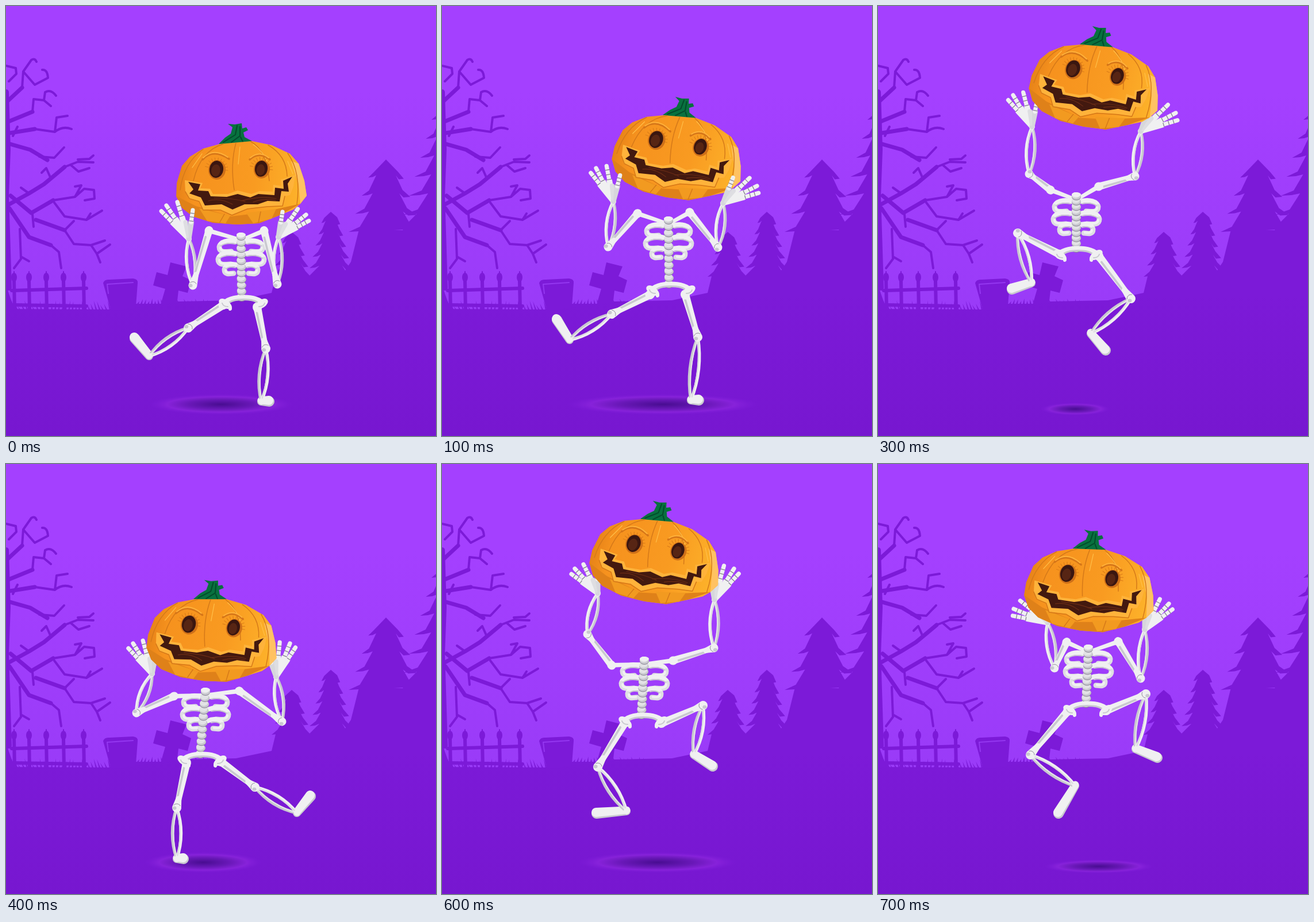
These frames come from a looping animation (748x748 px, 800 ms). An HTML page with a canvas:

```html
<!DOCTYPE html>
<html lang="en">
<head>
<meta charset="utf-8">
<title>Dancing pumpkin skeleton</title>
<style>
  html, body { margin: 0; width: 100%; height: 100%; overflow: hidden; background: #7a19d6; }
  canvas { display: block; width: 748px; height: 748px; }
</style>
</head>
<body>
<canvas id="stage" width="748" height="748"></canvas>
<script>
const ctx = document.getElementById('stage').getContext('2d');
const TAU = Math.PI * 2;
const BONE = '#f0f0f1', SHADE = '#c9c9cf', LINE = '#85808f', DUSK = '#7c1ad8';
ctx.lineCap = ctx.lineJoin = 'round';

// Drawing helpers
function fill(d, color) {
  ctx.fillStyle = color;
  ctx.fill(new Path2D(d));
}
function line(d, color, width) {
  ctx.strokeStyle = color;
  ctx.lineWidth = width;
  ctx.stroke(new Path2D(d));
}
function oval(x, y, rx, ry, color, turn = 0) {
  ctx.fillStyle = color;
  ctx.beginPath();
  ctx.ellipse(x, y, rx, ry, turn, 0, TAU);
  ctx.fill();
}
function blend(color0, color1, x0, y0, x1, y1) {
  const g = ctx.createLinearGradient(x0, y0, x1, y1);
  g.addColorStop(0, color0);
  g.addColorStop(1, color1);
  return g;
}
const mix = (a, b, k) => a.map((v, i) => v + (b[i] - v) * k);
const polar = ([x, y], angle, r) => [x + Math.cos(angle) * r, y + Math.sin(angle) * r];
const heading = (a, b) => Math.atan2(b[1] - a[1], b[0] - a[0]);

function taper(a, b, ra, rb, color) {
  const t = heading(a, b), q = Math.PI / 2;
  ctx.fillStyle = color;
  ctx.beginPath();
  ctx.arc(...a, ra, t + q, t - q);
  ctx.arc(...b, rb, t - q, t + q);
  ctx.fill();
}

// Scenery
function pine(x, top, tiers, h, w) {
  let left = '', right = '';
  for (let i = 1; i <= tiers; i++) {
    const y = top + h * i / tiers, r = w * (.3 + .7 * i / tiers), in_ = r * .55;
    left += `L${x - r * .7} ${y - 9}L${x - r} ${y}L${x - r * .75} ${y - 1}L${x - in_} ${y - 4}`;
    right = `L${x + in_} ${y - 4}L${x + r * .72} ${y + 3}L${x + r} ${y + 2}L${x + r * .68} ${y - 10}` + right;
  }
  fill(`M${x} ${top}${left}${right}Z`, DUSK);
}

function scenery() {
  ctx.fillStyle = blend('#a440ff', '#9a3bf8', 0, 150, 0, 520);
  ctx.fillRect(0, 0, 748, 748);

  line('M0 150L3 250L0 330L5 490', DUSK, 10);
  line('M0 168L28 142M2 202L46 184M0 222L50 214M0 238L42 250L72 268M0 348L40 326L66 310L102 280' +
    'M8 330L44 360L82 338M6 352L40 402L78 416M52 372L102 390', DUSK, 7);
  line('M28 142L30 114L44 94Q50 90 53 97M30 114L50 137L73 125Q72 110 63 111M0 104L17 108L18 118L5 131' +
    'M46 184L48 162L66 164L68 150Q78 144 87 156M66 164L78 174M50 214L85 219Q98 208 114 214M85 219L88 194L107 191', DUSK, 4);
  line('M58 262L84 264L101 246M66 310L78 300L70 282L62 290M102 280L125 271L152 272M125 267L145 266L152 260' +
    'M112 276L126 288L145 282M82 338L120 332L131 312L120 314M120 332L136 318L153 320L154 335L137 338' +
    'M84 342L102 366L140 372L167 356M140 372L147 361', DUSK, 4);
  line('M102 390L118 414L148 416L158 431L181 415M148 416L172 408M158 431L164 446M102 390L118 374' +
    'M78 416L92 428L96 456M24 388L26 440L14 456M26 436L40 444M46 362L48 384M20 210L12 226M40 326L26 316', DUSK, 4);

  for (const x of [14, 40, 70, 100, 135]) {
    line(`M${x} 478L${x + 1} 530`, DUSK, 6);
    oval(x, 472, 5, 8, DUSK);
    line(`M${x} 462V470`, DUSK, 2);
  }
  line('M10 495L140 491M12 520L140 522', DUSK, 6);

  let grass = 'M0 545V486L12 520';
  for (let x = 12; x < 350; x += 6) {
    const h = x < 185 ? 7 + 11 * Math.abs(Math.sin(x * 1.7)) : 3 + 6 * Math.abs(Math.sin(x * 2.3));
    const base = x < 190 ? 530 : 518;
    grass += `L${x} ${base}L${x + 4 * Math.sin(x)} ${base - h}L${x + 3} ${base}`;
  }
  fill(grass + 'L350 545Z', DUSK);
  fill('M169 482Q171 475 180 476L221 474Q230 475 229 482L225 535H184Z', DUSK);
  line('M178 500L176 484L221 481', '#9437f0', 2);
  fill('M286 446L314 453L307 470L322 477L316 499L300 495L296 530H266L277 492L256 486L262 463L281 468Z', DUSK);

  pine(497, 393, 4, 78, 35);
  pine(565, 358, 5, 98, 37);
  pine(661, 267, 4, 126, 65);
  pine(775, 165, 6, 198, 84);
  fill('M0 527L200 528L300 514L400 512L462 499L470 466L515 462L526 471L545 452L582 447L590 460L600 445' +
    'L615 385L690 390L700 376L720 356L748 335V748H0Z', blend(DUSK, '#7717d0', 0, 500, 0, 748));
}

// Skeleton parts
function bone(a, b, r = 4.5) {
  const t = heading(a, b), end = mix(a, b, .9);
  taper(a, end, r + 2, r, BONE);
  taper(polar(mix(a, b, .12), t + 1.57, 2.5), polar(end, t + 1.57, 2.5), 1.8, 1.8, SHADE);
  taper(mix(a, b, .8), b, r, r + 3, BONE);
  oval(...a, r + 3.5, r + 3, BONE, t);
  oval(...polar(b, t + 1.2, 4), 3.5, 3, SHADE);
  ctx.strokeStyle = LINE;
  ctx.lineWidth = .9;
  ctx.beginPath();
  ctx.arc(...b, r + 2, t + 2.1, t + 4);
  ctx.stroke();
}

function twinBone(a, b) {
  const t = heading(a, b), m = mix(a, b, .5);
  for (const [side, color] of [[1, SHADE], [-1, BONE]]) {
    const c = polar(m, t + side * 1.57, 15);
    line(`M${a}Q${c} ${b}`, color, 5.5);
    line(`M${a}Q${polar(m, t + side * 1.57, 11)} ${b}`, side > 0 ? '#e5e5e8' : '#dcdce0', 2);
  }
  oval(...a, 6, 5, BONE, t);
  oval(...b, 5.5, 5, BONE, t);
}

function hand([, , wrist, tip], side) {
  const t = heading(wrist, tip), reach = Math.hypot(tip[0] - wrist[0], tip[1] - wrist[1]);
  [[-.19, .97], [0, 1], [.29, .96], [.73, .72]].forEach(([turn, k], i) => {
    const a = t + side * turn, end = polar(wrist, a, reach * k);
    const knuckle = polar(wrist, a, reach * k * .58);
    taper(wrist, knuckle, 4.5, 5, i == 3 ? '#d7d7dc' : BONE);
    taper(knuckle, end, 3.6, 3.6, BONE);
    for (const s of [.62, .76, .89]) {
      const p = polar(wrist, a, reach * k * s);
      line(`M${polar(p, a + 1.57, 3.6)}L${polar(p, a - 1.57, 3.6)}`, LINE, 1.3);
    }
  });
  taper(polar(wrist, t, 4), polar(wrist, t + side * .4, reach * .42), 2, 4, '#dedee2');
}

function arm(joints) {
  const [shoulder, elbow, wrist] = joints;
  twinBone(elbow, wrist);
  bone(shoulder, elbow);
}

function leg([hip, knee, ankle, toe]) {
  taper(ankle, toe, 7, 9, SHADE);
  taper([ankle[0], ankle[1] - 2], [toe[0] - 1, toe[1] - 2], 6.5, 8, BONE);
  twinBone(knee, ankle);
  bone(hip, knee, 5);
}

function rib(side, y, w, h) {
  ctx.save();
  ctx.scale(side, 1);
  line(`M4 ${y}C${w * .6} ${y - 7} ${w} ${y} ${w} ${y + h * .5}`, BONE, 8);
  line(`M${w} ${y + h * .5}C${w} ${y + h + 4} ${w * .6} ${y + h} ${w * .45} ${y + h}`, '#dedee2', 9);
  line(`M${w - 2} ${y + h * .6}C${w - 2} ${y + h} ${w * .7} ${y + h} ${w * .5} ${y + h - 1}`, BONE, 4);
  line(`M10 ${y + 3}Q${w * .7} ${y} ${w - 3} ${y + h * .4}`, SHADE, 2);
  ctx.restore();
}

function torso({ neck, pelvis, left, right }) {
  ctx.save();
  ctx.translate(...neck);
  for (const side of [-1, 1]) {
    rib(side, 13, 38, 16);
    rib(side, 34, 40, 17);
    rib(side, 54, 29, 13);
  }
  ctx.restore();
  for (const arm of [left, right]) taper([neck[0], neck[1] + 9], arm[0], 3, 4, BONE);
  for (let i = 10; i >= 0; i--) {
    const [x, y] = mix(neck, [pelvis[0] - 3, pelvis[1] - 14], i / 10);
    oval(x, y + 4, 8, 6, LINE);
    oval(x, y + 3, 8, 6, SHADE);
    oval(x - 1, y + 1, 7, 5, '#e2e2e5');
  }
  oval(...neck, 8, 4, BONE);

  ctx.save();
  ctx.translate(...pelvis);
  line('M-34 1C-28 -15 28 -15 34 1', BONE, 9);
  line('M-27 0C-18 -10 18 -10 27 0', SHADE, 3);
  for (const side of [-1, 1]) {
    oval(side * 32, 0, 12, 7, BONE, side * -.6);
    line(`M${side * 32} 1Q${side * 22} 0 ${side * 23} 9`, BONE, 6);
    line(`M${side * 27} 5Q${side * 35} 5 ${side * 37} -1`, SHADE, 2);
  }
  ctx.restore();
}

function pumpkin([x, y, turn]) {
  ctx.save();
  ctx.translate(x, y);
  ctx.rotate(turn * Math.PI / 180);
  ctx.translate(-405, -283);

  fill('M370 240L381 229L391 222L394 211L386 205L398 206L410 204L411 213L418 211L421 216L413 220L415 228L428 235L400 242Z', '#08713f');
  line('M378 237L399 224L402 208M392 237L407 226L407 210M412 236L408 228', '#034b2b', 2);

  const body = 'M372 240L428 235L462 242L494 257L509 274L519 304L523 330L512 344L500 354L476 364L440 378L401 380' +
    'L360 377L325 366L306 351L296 331L297 308L306 278L320 262L343 248Z';
  const skin = ctx.createLinearGradient(296, 300, 523, 320);
  skin.addColorStop(0, '#e68218');
  skin.addColorStop(.15, '#f6921e');
  skin.addColorStop(.6, '#f99b21');
  skin.addColorStop(1, '#fdb52b');
  fill(body, skin);
  fill('M297 331L330 348L392 366L440 360L512 344L476 364L440 378L401 380L360 377L325 366L306 351Z', '#df8119');
  fill('M336 352L390 365L382 378L350 374ZM418 360L470 353L462 370L430 378Z', '#f29a20');
  fill('M509 274L519 304L523 330L512 344L509 310L496 270Z', '#ffc262');
  line('M378 240Q338 252 326 304M400 238Q390 275 397 320M426 236Q453 250 458 304M456 242Q488 260 489 296' +
    'M343 249Q309 273 303 320M490 256Q514 290 506 345M380 362L372 376M443 358L439 377', '#d57919', 1.5);
  line('M407 245L404 275M430 241Q450 255 455 274M341 257L324 281M490 270L499 292', '#ffc04a', 1.2);

  // Brows and eyes
  line('M342 267Q360 247 388 266M424 267Q440 252 459 267', '#d67618', 3.5);
  line('M343 264Q361 246 386 263M425 264Q441 251 457 264', '#ffb13a', 2);
  for (const [ex, ey, rx, ry] of [[366, 284, 12, 15], [444, 283, 11, 14]]) {
    for (let a = -2.9; a < .1; a += .3)
      line(`M${polar([ex, ey], a, 15)}L${polar([ex, ey], a, 20)}`, '#d87a18', 1);
    oval(ex + 1, ey + 1, rx + 3, ry + 2, '#cf7018', .15);
    oval(ex, ey, rx, ry, '#3a1610', .15);
    oval(ex - 1, ey + 2, rx * .65, ry * .7, '#572514', .15);
  }

  // Mouth
  fill('M311 303L342 308L338 317L355 318L360 327L386 327L403 321L427 327L441 322L464 323L465 311L479 313L478 302' +
    'L503 294L500 314L494 329L484 331L481 347L455 348L420 352L393 363L373 354L343 354L336 339L318 335L312 322Z', '#ffb33b');
  fill('M317 306L338 310L334 321L352 322L356 331L384 332L403 327L425 333L439 327L467 329L468 316L483 318L482 304L498 297' +
    'L490 309L492 323L479 322L476 340L455 339L438 345L415 345L394 354L375 345L346 347L339 333L319 326L326 319Z', '#43190f');
  line('M352 339Q372 333 394 345M362 334Q394 334 416 340M409 339Q441 330 470 335M430 341Q449 334 469 338', '#6d2d16', 1.2);
  line('M312 323L319 335L336 340L343 355L373 355L393 364L420 353L455 349L481 348L485 331', '#d57919', 1.5);
  ctx.restore();
}

function shadow([x, y, rx, ry]) {
  ctx.save();
  ctx.translate(x, y);
  ctx.scale(rx, ry);
  const g = ctx.createRadialGradient(0, 0, 0, 0, 0, 1);
  g.addColorStop(0, '#480d91');
  g.addColorStop(.45, '#6918b8');
  g.addColorStop(.75, '#8722da');
  g.addColorStop(1, '#7d1bd800');
  oval(0, 0, 1, 1, g);
  ctx.restore();
}

// Arms: shoulder, elbow, wrist, fingertip. Legs: hip, knee, ankle, toe.
const pose = [];
pose[0] = {
  head: [405, 283, 0], neck: [409, 398], pelvis: [413, 518], shade: [374, 693, 125, 18], front: 1,
  left: [[353, 391], [325, 486], [318, 405], [279, 347]], right: [[449, 391], [472, 484], [474, 402], [522, 363]],
  legL: [[378, 520], [317, 560], [249, 609], [224, 578]], legR: [[437, 524], [452, 596], [444, 688], [458, 688]]
};
pose[1] = {
  head: [411, 238, 10], neck: [394, 370], pelvis: [398, 495], shade: [384, 693, 167, 18], front: 1,
  left: [[340, 361], [289, 419], [298, 340], [268, 282]], right: [[431, 359], [480, 420], [489, 343], [548, 313]],
  legL: [[362, 502], [295, 536], [222, 581], [200, 546]], legR: [[423, 502], [445, 576], [433, 686], [447, 686]]
};
pose[3] = {
  head: [378, 115, 10], neck: [345, 328], pelvis: [348, 433], shade: [343, 701, 60, 11], front: 0,
  left: [[300, 320], [263, 292], [268, 210], [235, 155]], right: [[384, 314], [447, 296], [457, 218], [518, 186]],
  legL: [[316, 432], [243, 395], [267, 482], [233, 493]], legR: [[384, 435], [440, 509], [370, 570], [396, 599]]
};
pose[4] = {
  head: [357, 281, 5], neck: [347, 393], pelvis: [341, 516], shade: [343, 693, 102, 18], front: 0,
  left: [[292, 404], [227, 433], [254, 365], [221, 312]], right: [[406, 395], [480, 448], [470, 370], [494, 312]],
  legL: [[314, 520], [297, 598], [297, 687], [309, 687]], legR: [[374, 518], [433, 562], [506, 607], [530, 578]]
};
pose[6] = {
  head: [372, 144, 10], neck: [352, 339], pelvis: [350, 448], shade: [375, 693, 138, 18], front: 0,
  left: [[295, 350], [253, 296], [271, 225], [231, 182]], right: [[402, 342], [473, 320], [474, 236], [508, 182]],
  legL: [[318, 450], [271, 527], [321, 604], [269, 608]], legR: [[382, 451], [454, 420], [438, 506], [471, 526]]
};
pose[7] = {
  head: [368, 194, 7], neck: [366, 318], pelvis: [365, 428], shade: [384, 700, 95, 12], front: 0,
  left: [[328, 310], [307, 355], [295, 276], [236, 252]], right: [[418, 309], [457, 373], [464, 288], [506, 243]],
  legL: [[330, 430], [265, 506], [343, 560], [314, 608]], legR: [[397, 429], [466, 400], [448, 496], [486, 511]]
};
function between(a, b) {
  if (!Array.isArray(a)) return (a + b) / 2;
  return a.map((v, i) => between(v, b[i]));
}
function halfway(a, b) {
  return Object.fromEntries(Object.keys(a).map(k => [k, between(a[k], b[k])]));
}
pose[2] = halfway(pose[1], pose[3]);
pose[5] = halfway(pose[4], pose[6]);

function draw(p) {
  scenery();
  shadow(p.shade);
  leg(p.legL);
  leg(p.legR);
  torso(p);
  arm(p.left);
  arm(p.right);
  const hands = () => { hand(p.left, 1); hand(p.right, -1); };
  if (!p.front) hands();
  pumpkin(p.head);
  if (p.front) hands();
}

let shown = -1;
function tick(now) {
  const step = Math.floor(now / 100) % 8;
  if (step !== shown) draw(pose[shown = step]);
  requestAnimationFrame(tick);
}
draw(pose[0]);
requestAnimationFrame(tick);
</script>
</body>
</html>
```
